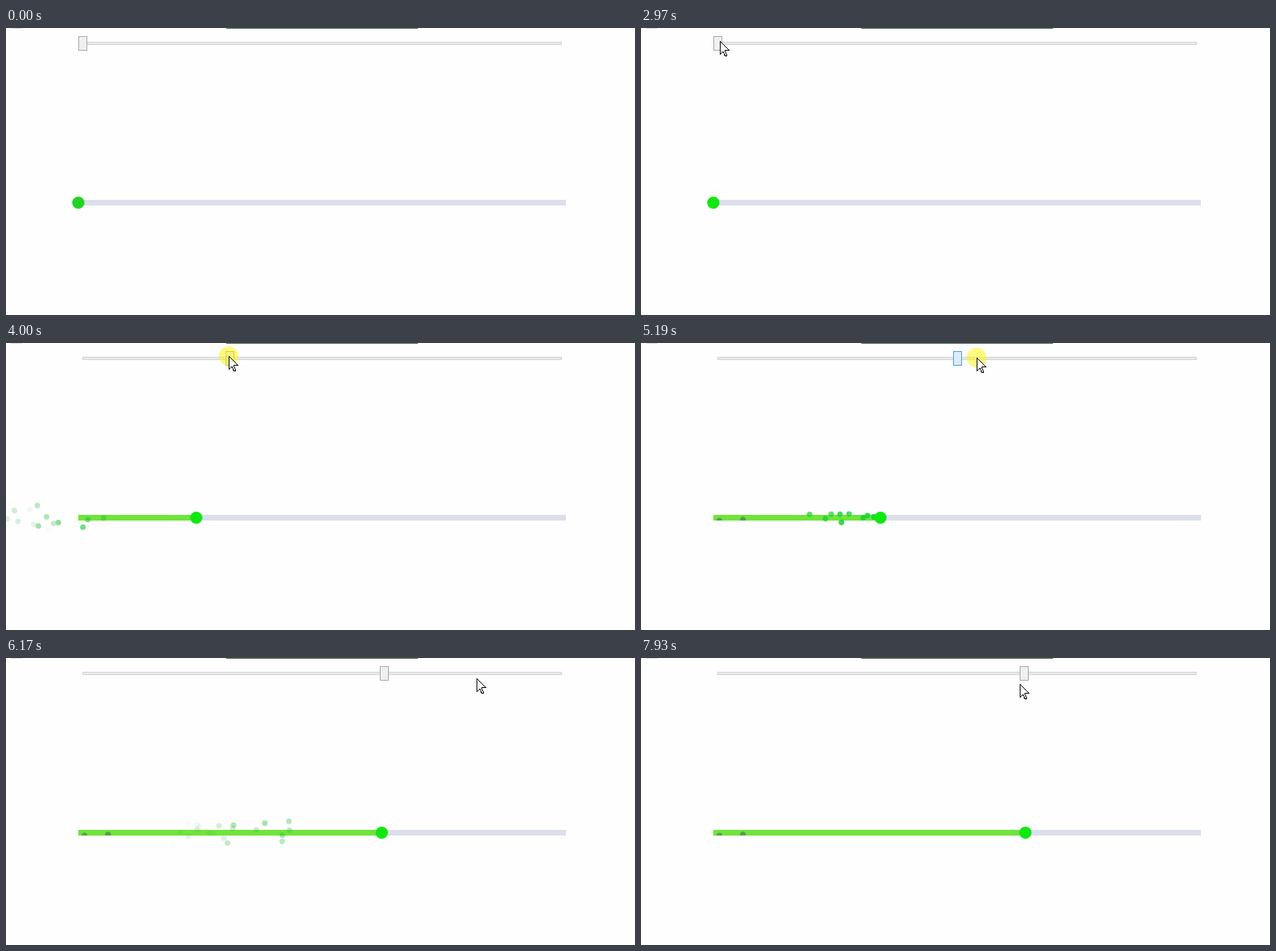
An HTML page for the animation above (8 s loop, 774 by 354 pixels).

```html
<!DOCTYPE html>
<html lang="en">
<head>
<meta charset="utf-8">
<title>Slider and progress bar</title>
<style>
  html, body { margin: 0; width: 100%; height: 100%; overflow: hidden; background: #fefefe; }
  svg { display: block; width: 774px; height: 354px; }
</style>
</head>
<body>
<svg viewBox="0 0 774 354">
  <path d="M6 .5H20" stroke="#dcdcdc"/>
  <path d="M271 .5H507" stroke="#567656"/>
  <rect x="94.5" y="17.5" width="589" height="3" fill="#e7eaea" stroke="#d6d6d6"/>
  <rect id="thumb" y="10.5" width="10" height="17"/>
  <rect x="89" y="212" width="600" height="7" fill="#dbdfeb"/>
  <rect id="fill" x="89" y="212" height="7" fill="#6fe53b"/>
  <path id="specks" d="M93 219a3.5 3.5 0 0 1 7 0zM122 219a3.7 3.7 0 1 1 7 0z" fill="#58a04a"/>
  <g id="sparks"></g>
  <circle id="knob" cy="215.5" r="7.6"/>
  <g id="pointer">
    <circle id="press" r="12" fill="#fff500" fill-opacity=".5"/>
    <path d="M.5 .5V16.5L4 13L6.5 18.5H8.5V17.5L6.5 12.5V11.5H11.5Z"
          fill="#fff" stroke="#111" shape-rendering="crispEdges"/>
  </g>
</svg>
<script>
const LOOP = 8000;
const SPARK_LIFE = 1000;
const el = id => document.getElementById(id);
const set = (node, attrs) => {
  for (const key in attrs) node.setAttribute(key, attrs[key]);
};
const within = (t, from, to) => t >= from && t < to;
const smooth = p => p * p * (3 - 2 * p);

// A track lists [time, value, ...] and eases from one point to the next.
function sample(track, t) {
  const next = track.findIndex(key => key[0] > t);
  if (next <= 0) return track.at(next).slice(1);
  const [a, b] = [track[next - 1], track[next]];
  const p = smooth((t - a[0]) / (b[0] - a[0]));
  return a.slice(1).map((v, i) => v + (b[i + 1] - v) * p);
}

const pointerTrack = [
  [0, 620, 340], [830, 184, 241], [1250, 88, 220], [1640, 166, 220], [1990, 202, 220],
  [2620, 97, 16], [3200, 97, 16], [3900, 274, 16], [4980, 274, 16], [5190, 413, 18],
  [5820, 579, 25], [6200, 579, 25], [6400, 587, 21], [6900, 587, 21], [7500, 466, 32]
];
const thumbTrack = [
  [3200, 94.5], [3900, 275.5], [4980, 275.5], [5190, 389.5],
  [5400, 465.5], [6520, 465.5], [6560, 471.5]
];
const knobTrack = [
  [3100, 89], [4380, 273], [4900, 273], [6300, 467], [6560, 467], [7200, 473]
];

let seed = 7;
const random = () => (seed = seed * 16807 % 2147483647) / 2147483647;

// Sparks leave the knob while it moves.
function emit(from, to, count) {
  return Array.from({ length: count }, (_, i) => {
    const born = from + (to - from) * i / count;
    const node = document.createElementNS("http://www.w3.org/2000/svg", "circle");
    set(node, { r: 3.4 });
    el("sparks").append(node);
    return {
      node, born, x: sample(knobTrack, born)[0],
      reach: 10 + random() * 90, rise: random() * 34 - 17
    };
  });
}
const sparks = [emit(3120, 3780, 15), emit(4970, 5780, 32), emit(6600, 6900, 6)].flat();

function drawSpark({ node, born, x, reach, rise }, t) {
  const age = (t - born) / SPARK_LIFE;
  const alive = within(age, 0, 1);
  const rest = 1 - age;
  const spread = 1 - rest ** 6;
  set(node, {
    cx: x - reach * spread - 30 * age,
    cy: 215.5 + rise * spread,
    fill: `hsl(128 ${85 - 50 * age}% 46%)`,
    opacity: alive ? rest ** 1.5 : 0
  });
}

function render(t) {
  const [px, py] = sample(pointerTrack, t);
  const [thumb] = sample(thumbTrack, t);
  const [knob] = sample(knobTrack, t);
  const active = within(t, 5000, 5400);
  const pressed = within(t, 1200, 2050) || within(t, 3080, 5350) || within(t, 6450, 6800);

  set(el("pointer"), {
    transform: `translate(${Math.round(px)} ${Math.round(py)})`,
    visibility: t < 70 ? "hidden" : "visible"
  });
  set(el("press"), { opacity: pressed ? 1 : 0 });
  set(el("thumb"), {
    x: Math.floor(thumb - 5) + .5,
    fill: active ? "#dcecfb" : "#f0f0f0",
    stroke: active ? "#569de5" : "#acacac"
  });
  set(el("fill"), { width: knob - 89 });
  set(el("knob"), { cx: knob, fill: t < 830 ? "#22d326" : "#10e80f" });
  set(el("specks"), { opacity: t < 4910 ? 0 : 1 });
  sparks.forEach(spark => drawSpark(spark, t));
}

const start = performance.now();
function tick() {
  render((performance.now() - start) % LOOP);
  requestAnimationFrame(tick);
}
tick();
</script>
</body>
</html>
```
